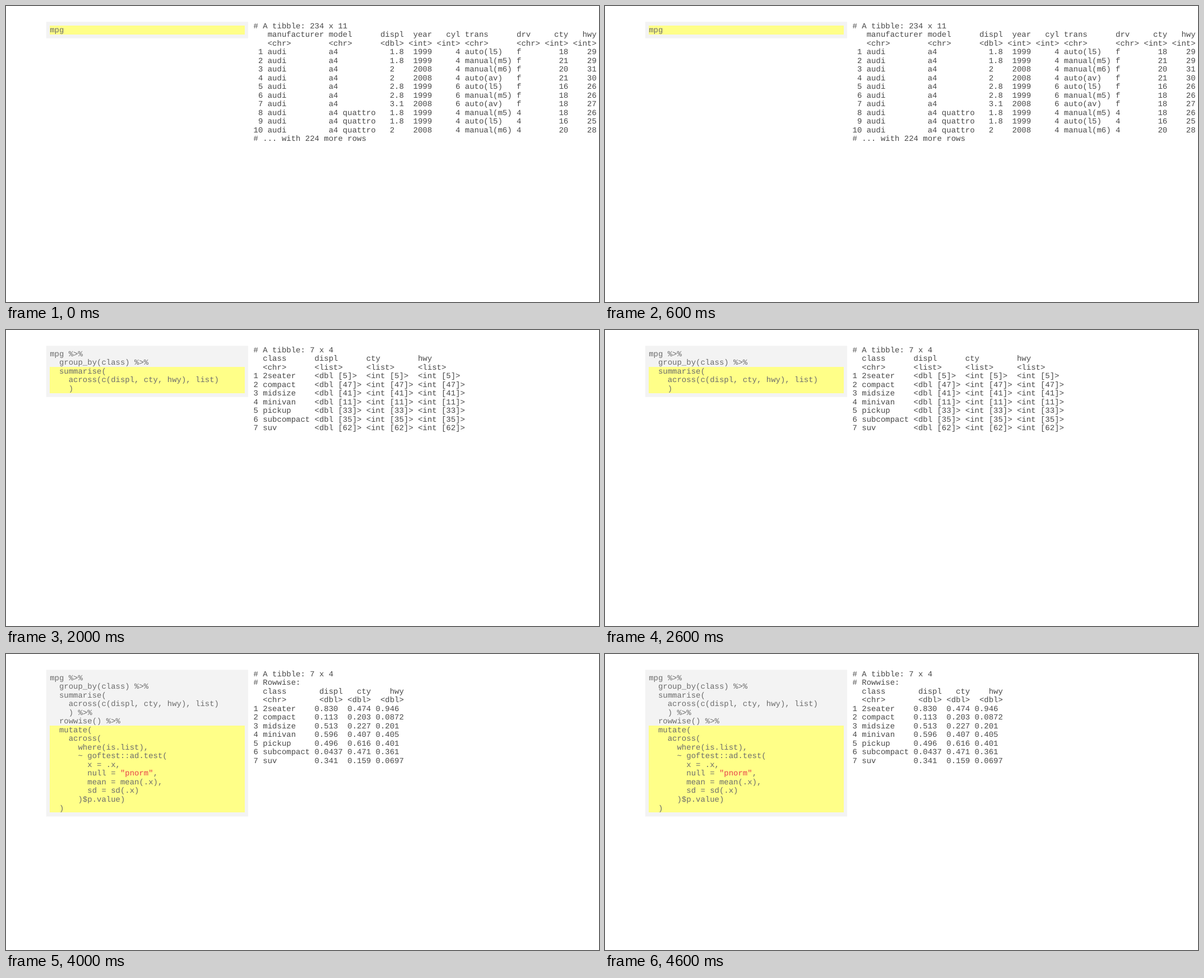
An HTML page that plays this animation: 1058 by 529 pixels, repeating every 5000 ms.

```html
<!DOCTYPE html>
<html lang="en">
<head>
<meta charset="utf-8">
<title>Rowwise pipeline</title>
<style>
html, body { margin: 0; width: 100%; height: 100%; overflow: hidden; background: #fff; }
svg { display: block; width: 1058px; height: 529px; }
text {
  font: 13.98px "Courier New", "Liberation Mono", monospace;
  white-space: pre;
  text-rendering: geometricPrecision;
  fill: #484848;
}
.code text { fill: #6c6c6c; }
.code .str { fill: #e8404a; }
.box { fill: #f3f3f3; }
.mark { fill: #ffff88; shape-rendering: crispEdges; }
.scene { opacity: 0; animation: show 5s step-end infinite; animation-delay: calc((var(--i) - 5) * 1s); }
@keyframes show {
  0% { opacity: 1; }
  20%, 100% { opacity: 0; }
}
</style>
</head>
<body>
<svg id="stage" viewBox="0 0 1058 529"></svg>
<script>
const code = `mpg %>%
  group_by(class) %>%
  summarise(
    across(c(displ, cty, hwy), list)
    ) %>%
  rowwise() %>%
  mutate(
    across(
      where(is.list),
      ~ goftest::ad.test(
        x = .x,
        null = "pnorm",
        mean = mean(.x),
        sd = sd(.x)
      )$p.value)
  )`.split('\n');

const carHead = [
  '   manufacturer model      displ  year   cyl trans      drv     cty   hwy',
  '   <chr>        <chr>      <dbl> <int> <int> <chr>      <chr> <int> <int>'
];
const cars = `a4|1.8|1999|4|auto(l5)|f|18|29
a4|1.8|1999|4|manual(m5)|f|21|29
a4|2  |2008|4|manual(m6)|f|20|31
a4|2  |2008|4|auto(av)|f|21|30
a4|2.8|1999|6|auto(l5)|f|16|26
a4|2.8|1999|6|manual(m5)|f|18|26
a4|3.1|2008|6|auto(av)|f|18|27
a4 quattro|1.8|1999|4|manual(m5)|4|18|26
a4 quattro|1.8|1999|4|auto(l5)|4|16|25
a4 quattro|2  |2008|4|manual(m6)|4|20|28`.split('\n').map((row, i) => {
  const [model, displ, year, cyl, trans, drv, cty, hwy] = row.split('|');
  return [
    String(i + 1).padStart(2), 'audi'.padEnd(12), model.padEnd(10),
    displ.padStart(5), year.padStart(5), cyl.padStart(5),
    trans.padEnd(10), drv.padEnd(5), cty.padStart(5), hwy.padStart(5)
  ].join(' ');
});
const carTable = [...carHead, ...cars, '# ... with 224 more rows'];

const classes = `2seater|5|0.830|0.474|0.946
compact|47|0.113|0.203|0.0872
midsize|41|0.513|0.227|0.201
minivan|11|0.596|0.407|0.405
pickup|33|0.496|0.616|0.401
subcompact|35|0.0437|0.471|0.361
suv|62|0.341|0.159|0.0697`.split('\n').map(row => row.split('|'));

const label = (name, i) => `${i + 1} ${name.padEnd(10)} `;
const listTable = [
  '  class      displ      cty        hwy',
  '  <chr>      <list>     <list>     <list>',
  ...classes.map(([name, n], i) => label(name, i) +
    ['dbl', 'int', 'int'].map(type => `<${type} [${n}]>`.padEnd(10)).join(' '))
];
const valueTable = [
  '  class       displ   cty    hwy',
  '  <chr>       <dbl> <dbl>  <dbl>',
  ...classes.map(([name, , displ, cty, hwy], i) =>
    label(name, i) + `${displ.padEnd(6)} ${cty.padEnd(5)} ${hwy}`)
];

const carSize = '# A tibble: 234 x 11';
const classSize = '# A tibble: 7 x 4';
// from, to: range of highlighted code lines
const scenes = [
  { from: 0, to: 1, out: [carSize, ...carTable] },
  { from: 1, to: 2, out: [carSize, '# Groups:   class [7]', ...carTable] },
  { from: 2, to: 5, out: [classSize, ...listTable] },
  { from: 5, to: 6, out: [classSize, '# Rowwise:', ...listTable] },
  { from: 6, to: 16, out: [classSize, '# Rowwise:', ...valueTable] }
];

const TOP = 35, STEP = 15.52;
const escapeText = s => s.replace(/&/g, '&amp;').replace(/</g, '&lt;').replace(/>/g, '&gt;');
const paint = s => escapeText(s).replace(/"\w+"/g, '<tspan class="str">$&</tspan>');
const lines = (list, x, y, format) => list.map((s, i) =>
  `<text xml:space="preserve" x="${x}" y="${(y + i * STEP).toFixed(2)}">${format(s)}</text>`).join('');
const rect = (name, x, y, w, h) =>
  `<rect class="${name}" x="${x}" y="${y}" width="${w}" height="${h}"/>`;

function scene({ from, to, out }, i) {
  const shown = code.slice(0, to);
  shown[to - 1] = shown[to - 1].replace(' %>%', '');
  return `<g class="scene" style="--i:${i}"><g class="code">` +
    rect('box', 71.7, 28.3, 360.3, to * STEP + 13.8) +
    rect('mark', 78, TOP + from * STEP, 348, (to - from) * STEP) +
    lines(shown, 78.2, 46.7, paint) + '</g>' +
    lines(out, 441.6, 39.5, escapeText) + '</g>';
}

document.getElementById('stage').innerHTML = scenes.map(scene).join('');
</script>
</body>
</html>
```
